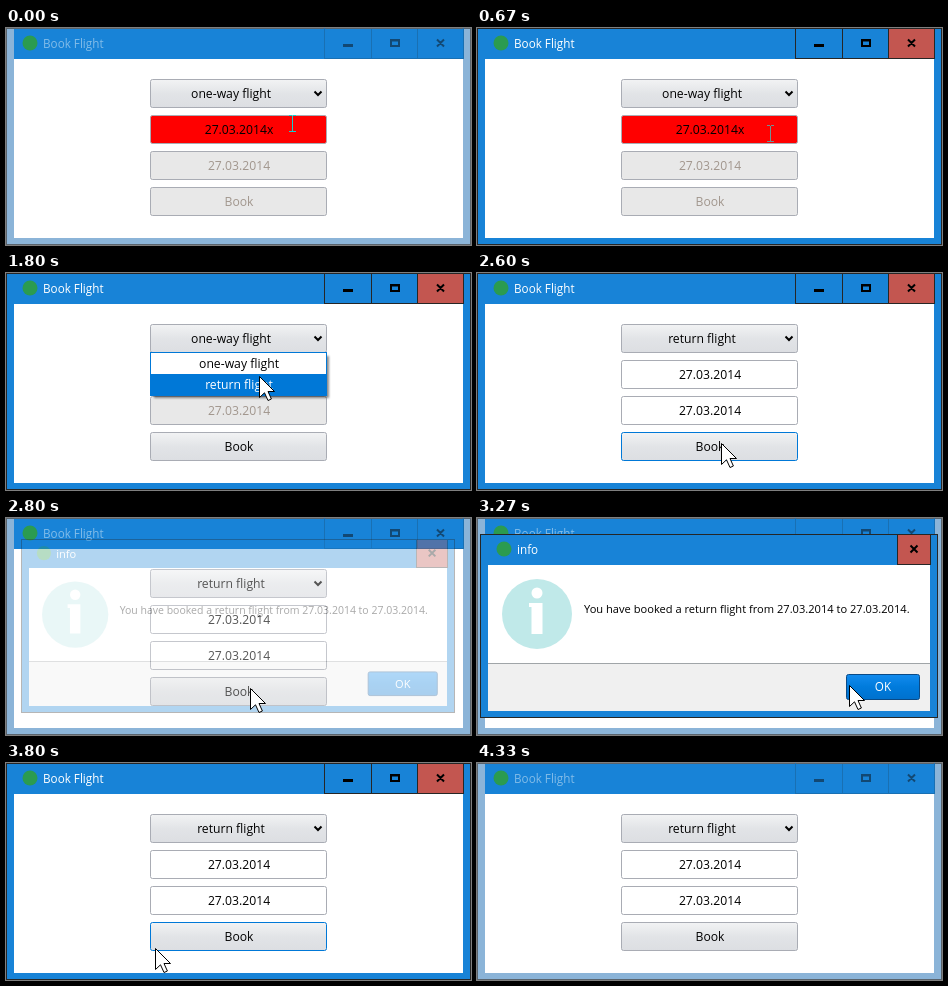
Recreate the animation shown at these times as an HTML page. Size 465 by 217 pixels, loop 4470 ms.

```html
<!DOCTYPE html>
<html lang="en">
<head>
<meta charset="utf-8">
<title>Book Flight</title>
<style>
html, body { margin: 0; width: 465px; height: 217px; overflow: hidden; background: #fff; }
svg { display: block; }
text { font-family: "Open Sans", "Noto Sans", sans-serif; font-size: 12.2px; }
.mid { text-anchor: middle; }
.caption { font-size: 11.7px; }
.crisp { shape-rendering: crispEdges; }
</style>
</head>
<body>
<svg width="465" height="217" viewBox="0 0 465 217">
  <defs>
    <linearGradient id="face" x2="0" y2="1">
      <stop offset="0" stop-color="#f2f3f4"/>
      <stop offset=".5" stop-color="#e2e4e7"/>
      <stop offset="1" stop-color="#dcdee2"/>
    </linearGradient>
    <linearGradient id="okFace" x2="0" y2="1">
      <stop offset="0" stop-color="#128bee"/>
      <stop offset=".5" stop-color="#007bdc"/>
      <stop offset="1" stop-color="#0071cd"/>
    </linearGradient>
    <filter id="blur" x="-10%" y="-20%" width="120%" height="140%"><feGaussianBlur stdDeviation="1"/></filter>
  </defs>

  <g class="crisp">
    <rect id="edge" width="465" height="217"/>
    <rect id="frame" x="1" y="1" width="463" height="215"/>
    <rect x="8" y="1" width="449" height="30" fill="#1883d7"/>
    <rect x="8" y="31" width="449" height="179" fill="#fff"/>
  </g>
  <circle cx="24" cy="15" r="7.5" fill="#2b9b50"/>
  <text id="title" class="caption" x="37" y="20">Book Flight</text>

  <g id="controls" fill="none">
    <rect id="closeFace" x="412" y="1" width="45" height="29"/>
    <path id="controlLines" class="crisp" d="M318.5 0V30.5H457.5V0M365.5 1V30M411.5 1V30"/>
    <path id="glyphs" stroke-width="2" d="M337 17H347M337 18H347M385 12H393V18H385ZM384 12.5H394M431 11.5L438 18.5M438 11.5L431 18.5"/>
  </g>

  <g id="form"></g>
  <path d="M308.5 63.5L312 67L315.5 63.5" fill="none" stroke="#000" stroke-width="2"/>
  <path id="caret" class="crisp" d="M.5 95V109" stroke="#000"/>

  <g id="popup">
    <rect x="148" y="83" width="175" height="42" fill="#000" opacity=".45" filter="url(#blur)"/>
    <rect class="crisp" x="144.5" y="79.5" width="176" height="43" fill="#fff" stroke="#0078d7"/>
    <rect id="marker" class="crisp" x="145" width="176" height="21" fill="#0078d7"/>
    <text id="item0" class="mid" x="233" y="95">one-way flight</text>
    <text id="item1" class="mid" x="233" y="116">return flight</text>
  </g>

  <g id="dialog">
    <g class="crisp">
      <rect x="3" y="16" width="458" height="184" fill="#262626"/>
      <rect x="4" y="17" width="456" height="182" fill="#1883d7"/>
      <rect x="11" y="47" width="442" height="98" fill="#fff"/>
      <rect x="11" y="145" width="442" height="1" fill="#a0a5a8"/>
      <rect x="11" y="146" width="442" height="47" fill="#f0f0f0"/>
      <rect x="420.5" y="16.5" width="33" height="30" fill="#c35650" stroke="#262626"/>
    </g>
    <path d="M433.5 27.5L440.5 34.5M440.5 27.5L433.5 34.5" stroke="#000" stroke-width="2"/>
    <circle cx="27" cy="31" r="7.5" fill="#2b9b50"/>
    <text class="caption" x="40" y="36" fill="#fff">info</text>
    <circle cx="60" cy="96" r="35" fill="#c0e9e9"/>
    <circle cx="60" cy="75" r="5.5" fill="#fff"/>
    <path d="M52 85H65.5V116H54.5V89H52Z" fill="#fff"/>
    <text x="107" y="95" style="font-size:11.1px">You have booked a return flight from 27.03.2014 to 27.03.2014.</text>
    <rect x="369.5" y="156.5" width="73" height="25" rx="2" fill="url(#okFace)" stroke="#0a4a86"/>
    <text class="mid caption" x="406" y="173" fill="#fff">OK</text>
  </g>

  <g id="arrow">
    <path d="M-.5 .5V21.5L4.5 16.8L8 24.5L11.4 23L8 15.5H14.5Z" fill="#fff" stroke="#000"/>
  </g>
  <path id="beam" class="crisp" fill="none" d="M-3.5 -8H-.5M.5 -8H3.5M0 -8V8M-3.5 8H-.5M.5 8H3.5"/>
</svg>
<script>
const LOOP = 4470, TICK = 1000 / 15;
// Moments in ticks of 1/15 s
const FOCUS = 2, BEAM_FADE = 6, VALID = 12, BLINK = 8, OPEN = 20, PICK = 29,
      BOOK = 42, CONFIRM = 53, LEAVE = 61, BLUR = 65;

// Pointer stops: tick, x, y
const path = [
  [0, 286, 95], [3, 293, 105], [14, 293, 105], [19, 305, 64], [22, 305, 64],
  [27, 254, 103], [30, 253, 104], [38, 245, 170], [42, 245, 170],
  [49, 373, 167], [51, 380, 168], [53, 380, 168], [57, 150, 185], [61, 128, 217]
];

const $ = id => document.getElementById(id);
const clamp = v => Math.max(0, Math.min(1, v));
const set = (id, attrs) => {
  for (const name in attrs) $(id).setAttribute(name, attrs[name]);
};
const show = (id, on) => set(id, { visibility: on ? 'visible' : 'hidden' });

// Four equal form rows
const rows = ['trip', 'start', 'back', 'book'];
$('form').innerHTML = rows.map((id, i) => `
  <rect id="${id}" x="144.5" y="${51.5 + 36 * i}" width="176" height="28" rx="2"/>
  <text id="${id}Text" class="mid" x="${i ? 233 : 225}" y="${70 + 36 * i}"></text>`).join('');

function row(id, label, fill, enabled = true, stroke = '#a9acb4') {
  set(id, { fill: enabled ? fill : '#e8e8e8', stroke });
  set(id + 'Text', { fill: enabled ? '#000' : '#a1968d' });
  $(id + 'Text').textContent = label;
}

function pointer(tick) {
  const next = path.findIndex(stop => stop[0] > tick);
  if (next < 0) return path[path.length - 1].slice(1);
  const [t0, x0, y0] = path[next - 1], [t1, x1, y1] = path[next];
  const u = (tick - t0) / (t1 - t0), k = u * u * (3 - 2 * u);
  return [Math.round(x0 + (x1 - x0) * k), Math.round(y0 + (y1 - y0) * k)];
}

function drawWindow(active) {
  set('edge', { fill: active ? '#262626' : '#59636c' });
  set('frame', { fill: active ? '#1883d7' : '#8bb4d8' });
  set('title', { fill: active ? '#fff' : '#82bce8' });
  set('closeFace', { fill: active ? '#c35650' : '#1883d7' });
  set('controlLines', { stroke: active ? '#262626' : '#1970b3' });
  set('glyphs', { stroke: active ? '#000' : '#124873' });
}

function drawForm(tick, x, y, modal) {
  const valid = tick >= VALID, picked = tick >= PICK;
  const hover = valid && !modal && tick < LEAVE && x >= 144 && x < 321 && y >= 159 && y < 188;
  row('trip', picked ? 'return flight' : 'one-way flight', 'url(#face)');
  row('start', valid ? '27.03.2014' : '27.03.2014x', valid ? '#fff' : '#f00');
  row('back', '27.03.2014', '#fff', picked);
  row('book', 'Book', 'url(#face)', valid, hover ? '#0078d7' : '#a9acb4');

  // The caret starts lit on focus and again on typing
  const lit = tick - (valid ? VALID : FOCUS);
  show('caret', lit >= 0 && lit < BLINK);
  set('caret', { transform: `translate(${valid ? 264 : 268} 0)` });
}

function drawPopup(open, y) {
  show('popup', open);
  const second = y >= 101;
  set('marker', { y: second ? 101 : 80 });
  set('item0', { fill: second ? '#000' : '#fff' });
  set('item1', { fill: second ? '#fff' : '#000' });
}

function drawDialog(tick) {
  const shown = clamp((tick - BOOK + 1) / 3) * clamp((CONFIRM + 2 - tick) / 3);
  const scale = 0.92 + 0.08 * shown;
  show('dialog', shown > 0);
  set('dialog', {
    opacity: shown,
    transform: `translate(232 108) scale(${scale}) translate(-232 -108)`
  });
}

function drawPointer(tick, x, y, free) {
  const visible = tick < LEAVE;
  const inField = y >= 87 && y < 116 || tick >= PICK && y >= 123 && y < 152;
  const beam = free && inField;
  const color = tick >= VALID ? '#000' : tick >= BEAM_FADE ? '#6f9294' : '#10d0d0';
  show('beam', visible && beam);
  show('arrow', visible && !beam);
  set('beam', { transform: `translate(${x + .5} ${y + .5})`, stroke: color });
  set('arrow', { transform: `translate(${x} ${y})` });
}

function render(ms) {
  const tick = Math.floor((ms % LOOP + 4) / TICK);
  const [x, y] = pointer(tick);
  const open = tick >= OPEN && tick < PICK;
  const modal = tick >= BOOK && tick < CONFIRM;
  drawWindow(tick >= FOCUS && tick < BLUR && !modal);
  drawForm(tick, x, y, modal);
  drawPopup(open, y);
  drawDialog(tick);
  drawPointer(tick, x, y, !open && !modal);
}

const begin = performance.now();
function loop() {
  render(performance.now() - begin);
  requestAnimationFrame(loop);
}
render(0);
requestAnimationFrame(loop);
</script>
</body>
</html>
```
